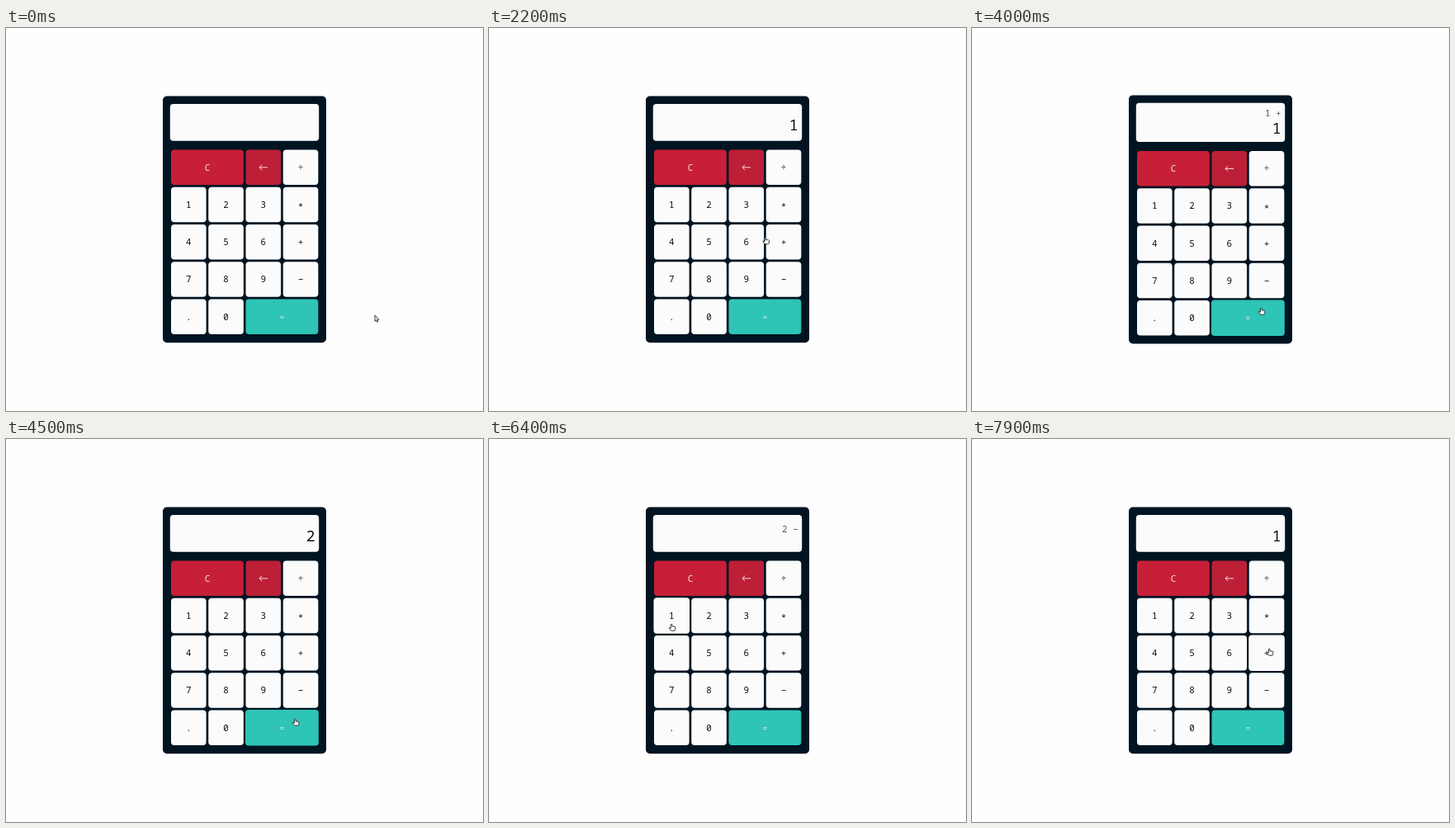
Animation, 578 px wide and 464 px high, one loop 8 s. Source, as an HTML page with a canvas:

```html
<!DOCTYPE html>
<html lang="en">
<head>
<meta charset="utf-8">
<title>Calculator</title>
<style>
  html, body { margin: 0; width: 100%; height: 100%; overflow: hidden; background: #fefefe; }
  canvas { display: block; width: 578px; height: 464px; }
</style>
</head>
<body>
<canvas id="stage"></canvas>
<script>
const W = 578, H = 464, LOOP = 8000, STEP = 100;
const canvas = document.getElementById('stage');
const ctx = canvas.getContext('2d');
const ratio = window.devicePixelRatio || 1;
canvas.width = W * ratio;
canvas.height = H * ratio;

const INK = '#08111c', NAVY = '#011422', WHITE = '#fbfbfb';
const RED = '#c71f37', DARK_RED = '#bd1f36', TEAL = '#2ec4b6';
const FONT = '"Noto Sans Mono", "DejaVu Sans Mono", monospace';
const PITCH = 45.25, SIZE = 42.6, LEFT = 200, TOP = 147.4;

// label, column, row, column span, fill
const keys = [['C', 0, 0, 2, RED], ['←', 2, 0, 1, DARK_RED], ['÷', 3, 0, 1, WHITE]];
['123*', '456+', '789−'].forEach((line, r) =>
  [...line].forEach((label, c) => keys.push([label, c, r + 1, 1, WHITE])));
keys.push(['.', 0, 4, 1, WHITE], ['0', 1, 4, 1, WHITE], ['=', 2, 4, 2, TEAL]);

// Pointer moves: start time, end time, destination
const START = [447, 348];
const moves = [
  [1000, 1600, 223, 228], [1950, 2280, 354, 258], [2650, 3000, 223, 231],
  [3500, 4000, 350, 339], [4700, 5300, 354, 309], [5650, 6300, 221, 224],
  [6600, 7000, 350, 340], [7400, 7850, 360, 254]
];

// Display states: time, history line, current entry
const states = [
  [0, '', ''], [1900, '', '1'], [2600, '1 +', ''], [3300, '1 +', '1'],
  [4300, '', '2'], [5500, '2 −', ''], [6500, '2 −', '1'], [7200, '', '1']
];

const smooth = p => p * p * (3 - 2 * p);

function pointerAt(t) {
  let [x, y] = START;
  for (const [from, to, tx, ty] of moves) {
    if (t < from) break;
    const p = smooth(Math.min(1, (t - from) / (to - from)));
    x += (tx - x) * p;
    y += (ty - y) * p;
  }
  return [x, y];
}

function box(x, y, w, h, r, fill) {
  ctx.beginPath();
  ctx.roundRect(x, y, w, h, r);
  ctx.fillStyle = fill;
  ctx.fill();
}

function text(str, x, y, size, color, align) {
  ctx.font = `${size}px ${FONT}`;
  ctx.textAlign = align;
  ctx.fillStyle = color;
  ctx.fillText(str, x, y);
}

function backArrow(x, y) {
  ctx.beginPath();
  ctx.moveTo(x + 5.2, y);
  ctx.lineTo(x - 4.8, y);
  ctx.moveTo(x - 1.6, y - 3.2);
  ctx.lineTo(x - 4.8, y);
  ctx.lineTo(x - 1.6, y + 3.2);
  ctx.strokeStyle = '#f6dfe3';
  ctx.lineWidth = 1;
  ctx.stroke();
}

function drawKey([label, col, row, span, fill], shift, pointer) {
  const x = LEFT + col * PITCH, y = TOP + row * PITCH + shift;
  const w = SIZE + (span - 1) * PITCH;
  const hover = pointer[0] >= x && pointer[0] <= x + w && pointer[1] >= y && pointer[1] <= y + SIZE;
  const grow = hover ? 0.5 : 0;
  box(x - grow, y - grow, w + grow * 2, SIZE + grow * 2, 4, fill);
  const cx = x + w / 2, cy = y + SIZE / 2;
  if (label === '←') return backArrow(cx, cy + 0.2);
  const drop = label === '*' ? 6.2 : 4;
  const size = label === '=' ? 9.5 : 10.9;
  text(label, cx, cy + drop, size, fill === WHITE ? INK : '#f0e8ea', 'center');
}

function outline(points) {
  ctx.beginPath();
  points.forEach(([x, y]) => ctx.lineTo(x, y));
  ctx.closePath();
  ctx.fillStyle = '#fff';
  ctx.fill();
  ctx.strokeStyle = '#202428';
  ctx.lineWidth = 0.9;
  ctx.lineJoin = 'round';
  ctx.stroke();
}

const ARROW = [[0, 0], [0, 7.3], [1.6, 5.8], [2.7, 8.3], [3.9, 7.7], [2.8, 5.4], [4.8, 5.2]];
const HAND = [[-0.6, 0.5], [0.4, 0], [1, 0.7], [1, 2.9], [4, 3.3], [5, 4.1], [4.7, 6.5],
  [4, 8.2], [-0.4, 8.2], [-2.8, 5.2], [-2.4, 4.4], [-0.6, 5.2]];

function drawPointer([x, y]) {
  const overKeys = x > LEFT && x < LEFT + 4 * PITCH && y > TOP && y < TOP + 5 * PITCH;
  ctx.save();
  ctx.translate(x, y);
  outline(overKeys ? HAND : ARROW);
  ctx.restore();
}

function draw(t) {
  const [, history, entry] = states.filter(s => s[0] <= t).pop();
  const tall = history && entry;
  const grow = tall ? 1.2 : 0;
  const pointer = pointerAt(t);

  ctx.setTransform(ratio, 0, 0, ratio, 0, 0);
  ctx.fillStyle = '#fefefe';
  ctx.fillRect(0, 0, W, H);
  box(190, 82.6 - grow, 198, 298.6 + grow * 2, 5, NAVY);
  box(198.8, 92 - grow, 180.4, 44.7 + grow * 2, 4, WHITE);
  text(history, 374.6, tall ? 106.6 : 113, 10.9, '#50565c', 'right');
  text(entry, 374.6, tall ? 128.3 : 123.6, 18, INK, 'right');
  keys.forEach(key => drawKey(key, tall ? 1.5 : 0, pointer));
  drawPointer(pointer);
}

function frame(now) {
  draw(Math.floor((now % LOOP) / STEP) * STEP);
  requestAnimationFrame(frame);
}
draw(0);
requestAnimationFrame(frame);
</script>
</body>
</html>
```
